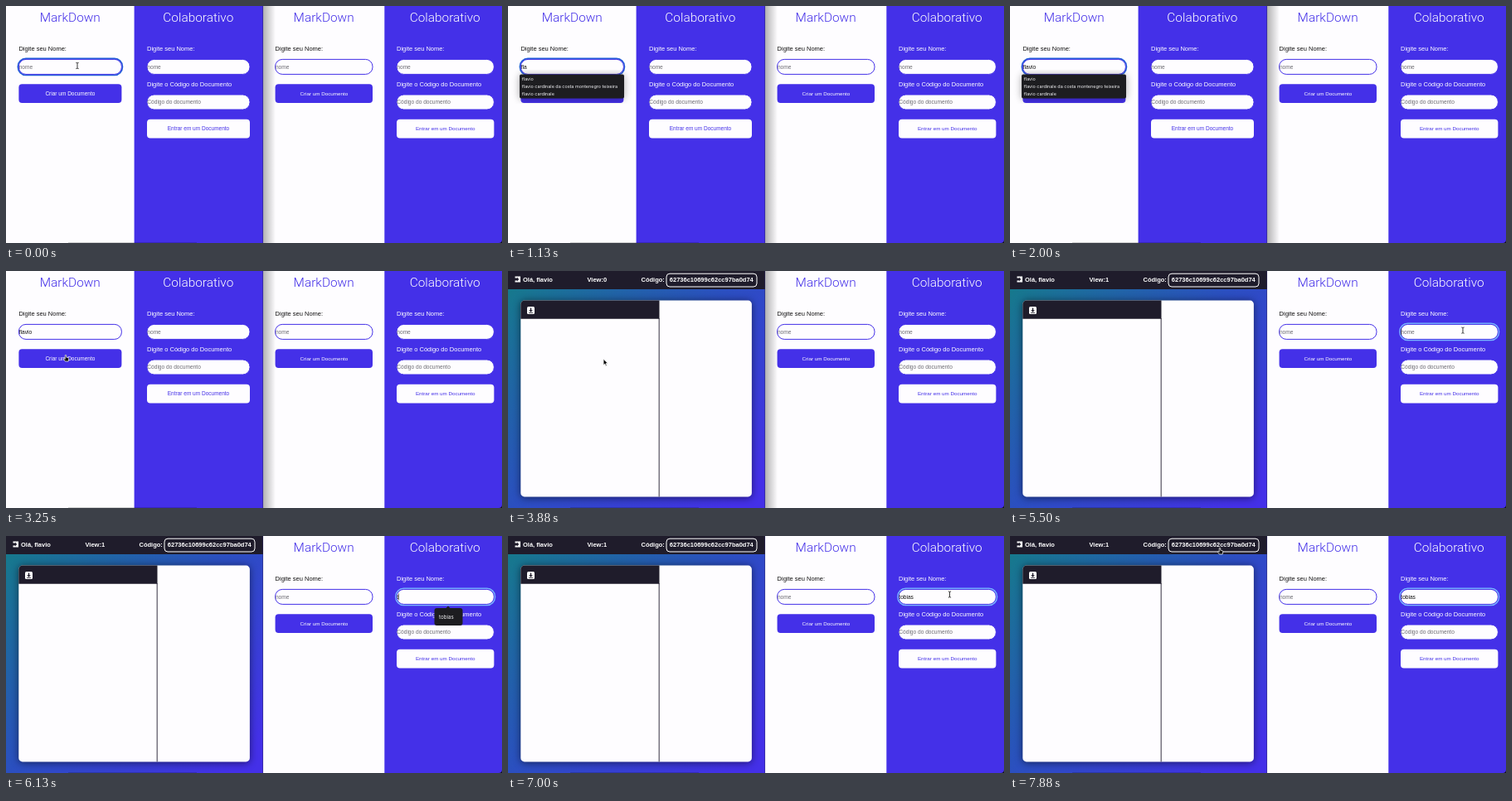
These frames come from a looping animation (598x286 px, 8000 ms). An HTML page:

```html
<!DOCTYPE html>
<html lang="pt">
<head>
<meta charset="utf-8">
<title>Markdown colaborativo</title>
<style>
html, body { margin: 0; width: 100%; height: 100%; overflow: hidden; background: #fefdff; }
svg { display: block; width: 598px; height: 286px; font-family: "Liberation Sans", Arial, sans-serif; }
.title { font: 300 15.4px Roboto, "Liberation Sans", sans-serif; text-anchor: middle; }
.label { font-size: 7.5px; }
.hint { font-size: 6.6px; fill: #6d6d73; }
.mid { text-anchor: middle; }
.nav { font-size: 7.5px; font-weight: 700; fill: #fff; }
.menu { font-family: Inter, "Liberation Sans", sans-serif; fill: #f2f2f4; }
</style>
</head>
<body>
<svg id="stage" viewBox="0 0 598 286"></svg>
<script>
const LOOP = 8000, STEP = 125;
const PURPLE = '#4430e8', WHITE = '#fefdff', DARK = '#1f1c2b', MENU = '#1d1d20';
const HOST = 'flavio', GUEST = 'tobias';
const FULL = [HOST, HOST + ' cardinale da costa montenegro teixeira', HOST + ' cardinale'];

const rect = (x, y, w, h, fill, r = 0, more = '') =>
  `<rect x="${x}" y="${y}" width="${w}" height="${h}" rx="${r}" fill="${fill}" ${more}/>`;
const text = (x, y, str, cls, more = '') => `<text x="${x}" y="${y}" class="${cls}" ${more}>${str}</text>`;
const group = (id, body) => `<g id="${id}">${body}</g>`;

// One input; a named input can show focus, typed text and a caret.
function input(x, y, w, hint, id) {
  const edge = `stroke="${PURPLE}" stroke-width="1"`;
  let out = '';
  if (id) out += rect(x - 1, y - 1, w + 2, 20, 'none', 9.6,
    `id="${id}Ring" stroke="${id === 'host' ? '#2460d8' : '#78b7ff'}" stroke-width="1.7"`);
  out += rect(x, y, w, 18, WHITE, 8.6, edge);
  out += text(x + .3, y + 11.4, hint, 'hint', id ? `id="${id}Hint"` : '');
  if (id) out += text(x + .3, y + 11.4, '', 'hint', `id="${id}Text" style="fill:#111"`) +
    rect(x, y + 5, .6, 8, '#111', 0, `id="${id}Caret"`);
  return out;
}

function button(x, y, w, str, bg, fg, size) {
  return rect(x, y, w, 22.6, bg, 4) +
    text(x + w / 2, y + 13.6, str, 'mid', `fill="${fg}" font-size="${size}"`);
}

function home(x, split, right, pad, col, w, size, hostId, guestId) {
  const end = right - split;
  return rect(x, 0, split - x, 286, WHITE) + rect(split, 0, end, 286, PURPLE) +
    text((x + split) / 2, 19, 'MarkDown', 'title', `fill="${PURPLE}"`) +
    text(split + (right - split) / 2 - .5, 19, 'Colaborativo', 'title', 'fill="#fff"') +
    text(pad, 54.4, 'Digite seu Nome:', 'label', 'fill="#111"') +
    input(pad, 64.4, w, 'nome', hostId) +
    button(pad, 94.3, w, 'Criar um Documento', PURPLE, '#fff', size) +
    text(col, 54.4, 'Digite seu Nome:', 'label', 'fill="#fff"') +
    input(col, 64.4, w, 'nome', guestId) +
    text(col, 97.2, 'Digite o Código do Documento', 'label', 'fill="#fff"') +
    input(col, 107, w, 'Código do documento') +
    button(col, 136.8, w, 'Entrar em um Documento', WHITE, PURPLE, size);
}

function editor() {
  return rect(0, 0, 310, 286, 'url(#sky)') +
    rect(15, 36, 279, 238, '#000', 5, 'opacity=".5" filter="url(#soft)"') +
    rect(0, 0, 310, 22, DARK) +
    '<path d="M8.5 6.5h6.5v7h-6.5v-2h2.6v1l2-2.5-2-2.5v1h-2.6z" fill="#fff"/>' +
    text(18, 13.3, 'Olá, ' + HOST, 'nav') +
    text(95.5, 13.3, 'View:0', 'nav', 'id="view"') +
    text(160.5, 13.3, 'Código:', 'nav') +
    rect(191, 3.2, 109, 15.8, 'none', 4, 'stroke="#fff" stroke-width="1"') +
    text(194.8, 13.3, '62736c10699c62cc97ba0d74', 'nav') +
    rect(15.3, 35.6, 278.6, 236.8, WHITE, 4.5) +
    `<path d="M15.3 57.8V40.1a4.5 4.5 0 0 1 4.5-4.5H182.5V57.8z" fill="${DARK}"/>` +
    rect(181.7, 57, .9, 215.4, DARK) +
    rect(23, 43, 9, 9, '#fff', 1.5) +
    `<path d="M26.8 44.5h1.4v2.8h1.6l-2.3 2.4-2.3-2.4h1.6zM25 50h5v.8h-5z" fill="${DARK}"/>`;
}

const menu = rect(14, 83, 126, 29, '#000', 2, 'opacity=".35" filter="url(#soft)"') +
  rect(14, 82.6, 126, 28.8, MENU, 2) +
  FULL.map((s, i) => text(16.8, 89.6 + i * 9.3, s, 'menu', 'font-size="5.45"')).join('');

const tip = `<path d="M529.5 88l3.5-3.4 3.5 3.4z" fill="${MENU}"/>` + rect(516.5, 87, 34, 21, MENU, 3) +
  text(522, 100, GUEST, 'menu', 'font-size="6.2"');

const cursors =
  '<path id="arrow" d="M0 0V7.2L1.7 5.7 2.9 8.4 4.1 7.9 2.9 5.3H5.2z" fill="#000" stroke="#fff" stroke-width=".7"/>' +
  '<path id="beam" d="M-1.6-3.6Q0-3.6 0-2.8 0-3.6 1.6-3.6M0-2.8V2.8M-1.6 3.6Q0 3.6 0 2.8 0 3.6 1.6 3.6" fill="none" stroke="#222" stroke-width=".9"/>' +
  '<path id="hand" d="M-.8-3.4Q0-4.2.7-3.4V-.9L3.2-.3Q3.9 0 3.8.8L3.2 4H-.6L-2.6 1.4Q-2.8.5-1.9.6L-.8 1.4z" fill="#111" stroke="#fff" stroke-width=".7"/>';

document.getElementById('stage').innerHTML = `<defs>
  <linearGradient id="sky" gradientUnits="userSpaceOnUse" x1="0" y1="20" x2="270" y2="286">
    <stop offset="0" stop-color="#16798c"/><stop offset=".5" stop-color="#2b4fc0"/><stop offset="1" stop-color="${PURPLE}"/>
  </linearGradient>
  <linearGradient id="fade"><stop stop-color="#000" stop-opacity=".3"/><stop offset="1" stop-opacity="0"/></linearGradient>
  <filter id="soft" x="-20%" y="-20%" width="140%" height="140%"><feGaussianBlur stdDeviation="5"/></filter>
  </defs>` +
  group('home', home(0, 154.6, 310, 15.4, 170, 124, 6.5, 'host')) +
  group('editor', editor()) +
  home(310, 456.3, 603, 324.6, 471, 117.4, 6.25, '', 'guest') +
  group('shadow', rect(310, 0, 15, 286, 'url(#fade)')) +
  rect(309.3, 0, .8, 286, '#28215f', 0, 'opacity=".6"') +
  rect(75, 285, 155, 1, '#000', 0, 'opacity=".18"') +
  '<path d="M598 282V286H594Q598 286 598 282z" fill="#111"/>' +
  group('menu', menu) + group('tip', tip) + group('cursor', cursors);

const $ = id => document.getElementById(id);
const show = (id, on) => $(id).style.display = on ? '' : 'none';

// Key times: when each letter lands.
const hostKeys = [750, 1000, 1125, 1375, 1625, 1875];
const guestKeys = [6000, 6250, 6375, 6500, 6625, 6750];
const typed = (word, keys, t) => word.slice(0, keys.filter(k => k <= t).length);

// Pointer: time, x, y, shape used from that time on.
const moves = [
  [0, 86, 72, 'beam'], [750, 86, 72, ''], [2500, 86, 74, 'beam'], [2750, 82, 86, 'arrow'],
  [2875, 75, 99, 'hand'], [3125, 72, 105, 'hand'], [3500, 72, 105, 'arrow'], [3750, 90, 108, 'arrow'],
  [4625, 543, 77, 'arrow'], [4750, 547.5, 69.5, 'arrow'], [5000, 547.5, 69.5, 'beam'],
  [5875, 545, 73, ''], [6875, 545, 73, 'beam'], [7125, 520, 68, 'arrow'],
  [7750, 258, 22, 'arrow'], [7875, 253, 18, 'hand'], [8000, 253, 18, 'hand']
];

function pointer(t) {
  let i = moves.length - 2;
  while (moves[i][0] > t) i--;
  const [a, x, y, shape] = moves[i], [b, x2, y2] = moves[i + 1];
  const p = (t - a) / (b - a), e = p * p * (3 - 2 * p);
  $('cursor').setAttribute('transform', `translate(${x + (x2 - x) * e} ${y + (y2 - y) * e})`);
  for (const s of ['arrow', 'beam', 'hand']) show(s, s === shape);
}

const widths = {};
function field(id, word, focused, t, since) {
  const el = $(id + 'Text');
  if (el.textContent !== word) {
    el.textContent = word;
    widths[id] = word ? el.getComputedTextLength() : 0;
  }
  show(id + 'Hint', !word);
  show(id + 'Ring', focused);
  show(id + 'Caret', focused && (t - since) % 1000 < 500);
  $(id + 'Caret').setAttribute('x', +el.getAttribute('x') + (widths[id] || 0) + .2);
}

function draw(now) {
  const t = Math.floor(now % LOOP / STEP) * STEP;
  const open = t >= 3500;
  show('home', !open);
  show('editor', open);
  field('host', typed(HOST, hostKeys, t), t < 3000, t, -500);
  field('guest', typed(GUEST, guestKeys, t), t >= 5125, t, 5125);
  show('menu', t >= 750 && t < 2500);
  show('tip', t >= 6000 && t < 6875);
  show('shadow', t < 4750);
  $('view').textContent = 'View:' + (t < 5125 ? 0 : 1);
  pointer(t);
}

function tick() {
  draw(performance.now());
  requestAnimationFrame(tick);
}
tick();
</script>
</body>
</html>
```
